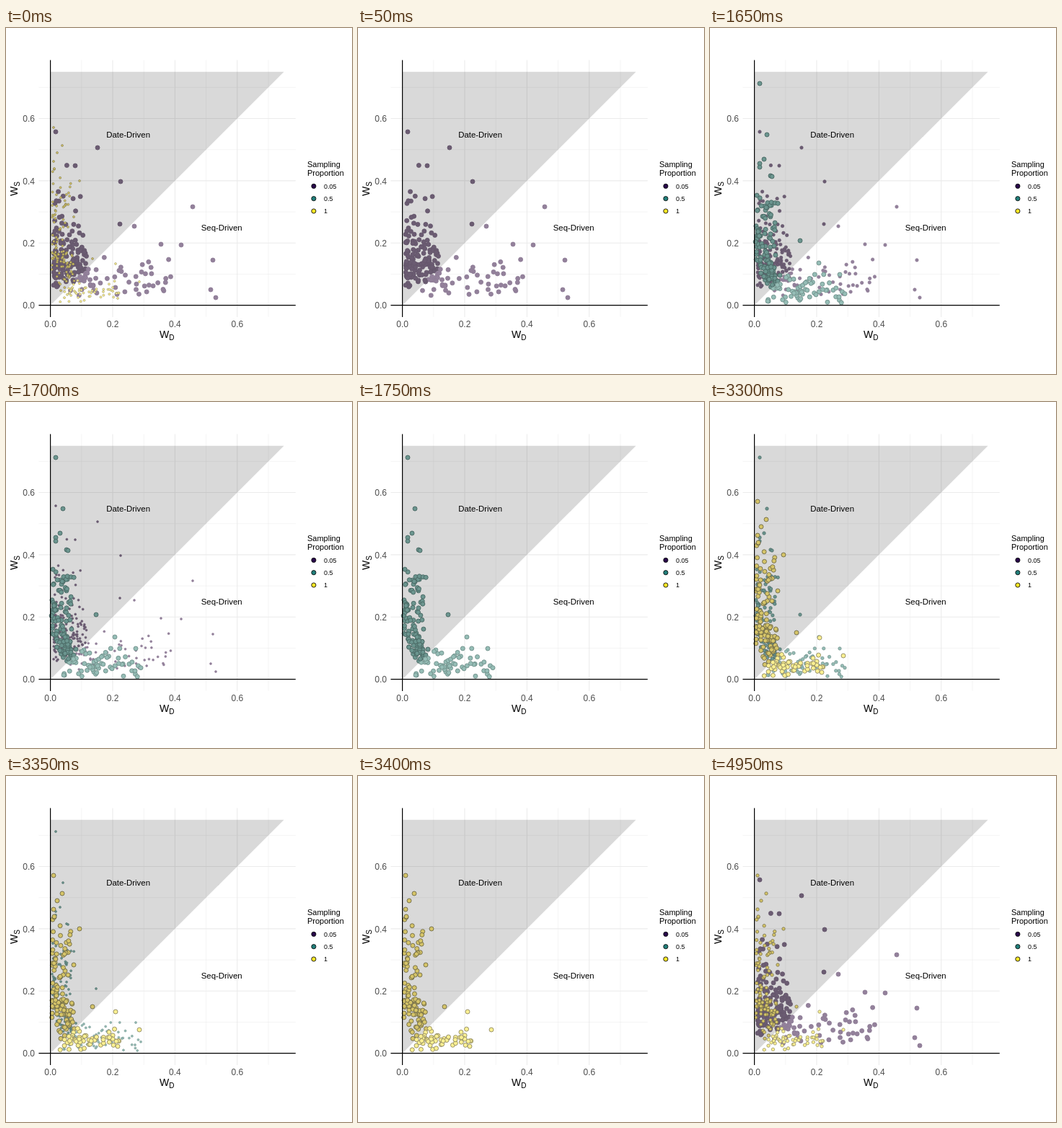
Animation, 480 px wide and 480 px high, one loop 5000 ms. Source, as an HTML page:

```html
<!DOCTYPE html>
<html lang="en">
<head>
<meta charset="utf-8">
<title>Scatter by sampling proportion</title>
<style>
  html, body { margin: 0; width: 100%; height: 100%; overflow: hidden; background: #fff; }
  svg { display: block; width: 100%; height: 100%; }
  text { font-family: "Liberation Sans", Arial, sans-serif; }
</style>
</head>
<body>
<svg id="plot" viewBox="0 0 480 480"></svg>
<script>
const svg = document.getElementById("plot");
const LOOP = 5000, STEP = 50;
const X0 = 61.6, Y0 = 384.7, UNIT = 432;
const LO = -0.0375, HI = 0.7875;
const px = v => X0 + v * UNIT;
const py = v => Y0 - v * UNIT;

function add(tag, attrs, parent = svg) {
  const el = document.createElementNS("http://www.w3.org/2000/svg", tag);
  for (const key in attrs) el.setAttribute(key, attrs[key]);
  parent.appendChild(el);
  return el;
}
function cross(v, stroke, width) {
  const attrs = { stroke, "stroke-width": width };
  add("line", { x1: px(v), y1: py(LO), x2: px(v), y2: py(HI), ...attrs });
  add("line", { x1: px(LO), y1: py(v), x2: px(HI), y2: py(v), ...attrs });
}
function label(str, x, y, size, fill = "#000", anchor = "start", parent = svg) {
  add("text", { x, y, fill, "font-size": size, "text-anchor": anchor }, parent).textContent = str;
}
function random(seed) {
  return () => (seed = (seed * 16807) % 2147483647) / 2147483647;
}

// n points that start at (x, y), reach w to the right and h upwards;
// larger powers pull them towards the start, lean tilts the cloud down.
function cloud(rnd, { n, x, w, y, h, xPow = 1, yPow = 1, lean = 0 }) {
  return Array.from({ length: n }, () => {
    const dx = w * rnd() ** xPow;
    const up = h * ((rnd() + rnd()) / 2) ** yPow;
    return [x + dx, Math.min(381, y + lean * dx - up)];
  });
}

// Clouds: dense core, tail up the vertical axis, spread along the floor.
const series = [
  {
    name: "0.05", key: "#28084a", seed: 4127, start: 4950, end: 1650,
    inside: ["#6b5c72", "#66576d"], outside: ["#93819b", "#8f7d97"],
    clouds: [
      { n: 115, x: 66, w: 46, xPow: 1.3, y: 370, h: 92 },
      { n: 24, x: 67, w: 40, xPow: 1.5, y: 300, h: 120, yPow: 1.3 },
      { n: 58, x: 100, w: 130, xPow: 1.6, y: 379, h: 68 }
    ],
    outliers: [[69, 144], [127, 166], [96, 191], [159, 213], [158, 272], [178, 275],
      [259, 248], [215, 300], [243, 301], [287, 322], [284, 363], [291, 374]]
  },
  {
    name: "0.5", key: "#21807c", seed: 9311, start: 1650, end: 3300,
    inside: ["#6b958f", "#496762"], outside: ["#95bdb6", "#71908b"],
    clouds: [
      { n: 80, x: 63, w: 28, y: 352, h: 85, lean: 1 },
      { n: 34, x: 65, w: 30, xPow: 1.2, y: 300, h: 80, yPow: 1.2 },
      { n: 66, x: 76, w: 112, y: 382, h: 46, yPow: 1.3 }
    ],
    outliers: [[69, 77], [79, 148], [75, 182], [69, 188], [69, 193], [84, 205],
      [86, 206], [125, 295], [151, 326], [180, 342], [179, 373]]
  },
  {
    name: "1", key: "#fde725", seed: 2753, start: 3300, end: 4950,
    inside: ["#d5c468", "#706a48"], outside: ["#fbf092", "#908a62"],
    clouds: [
      { n: 72, x: 63, w: 32, y: 345, h: 70, lean: 0.9 },
      { n: 40, x: 64, w: 26, xPow: 1.5, y: 310, h: 130, yPow: 1.1 },
      { n: 56, x: 73, w: 85, xPow: 1.1, y: 383, h: 34 }
    ],
    outliers: [[66, 138], [78, 163], [71, 173], [66, 185], [67, 195], [102, 212],
      [94, 262], [120, 320], [152, 327], [185, 352], [155, 375]]
  }
];

function drawPanel() {
  for (const v of [0.1, 0.3, 0.5, 0.7]) cross(v, "#ebebeb", 0.55);
  for (const v of [0.2, 0.4, 0.6]) cross(v, "#ebebeb", 1.07);
  add("path", {
    d: `M${px(0)} ${py(0)}V${py(0.75)}H${px(0.75)}Z`,
    fill: "#000", "fill-opacity": 0.15
  });
}

function drawDots(s) {
  const rnd = random(s.seed);
  const points = s.clouds.flatMap(c => cloud(rnd, c)).concat(s.outliers);
  s.group = add("g", {});
  s.dots = points.map(([cx, cy]) => {
    const [fill, stroke] = cx - X0 < Y0 - cy ? s.inside : s.outside;
    return add("circle", { cx, cy, fill, stroke }, s.group);
  });
}

function drawAxes() {
  cross(0, "#000", 1.2);
  for (const v of [0, 0.2, 0.4, 0.6]) {
    label(v.toFixed(1), px(v), 415, 12, "#4d4d4d", "middle");
    label(v.toFixed(1), 40, py(v) + 4.6, 12, "#4d4d4d", "end");
  }
  label("Date-Driven", px(0.25), 152, 11.4, "#000", "middle");
  label("Seq-Driven", px(0.55), 281, 11.4, "#000", "middle");
  const title = (sub, transform) => {
    const g = add("g", { transform });
    label("W", 0, 0, 14, "#000", "start", g);
    label(sub, 13.3, 3, 10, "#000", "start", g);
  };
  title("D", "translate(213 430)");
  title("S", "translate(15.5 233) rotate(-90)");
}

function drawLegend() {
  label("Sampling", 418, 193, 11);
  label("Proportion", 418, 205, 11);
  series.forEach((s, i) => {
    const cy = 219.4 + i * 17.3;
    add("circle", { cx: 426.9, cy, r: 3.1, fill: s.key, stroke: "#111", "stroke-width": 0.9 });
    label(s.name, 441, cy + 3.4, 9);
  });
}

drawPanel();
series.forEach(drawDots);
drawAxes();
drawLegend();

// A series appears at full size, holds, then shrinks away in two steps.
const SIZES = [3, 2.2, 1.5, 0];
function stageAt(s, t) {
  const since = (t - s.start + LOOP) % LOOP;
  const life = (s.end - s.start + LOOP) % LOOP;
  return since < life ? 0 : Math.min(3, 1 + Math.floor((since - life) / STEP));
}

function update(t) {
  for (const s of series) {
    const stage = stageAt(s, t);
    if (stage === s.stage) continue;
    s.stage = stage;
    s.group.setAttribute("display", stage < 3 ? "inline" : "none");
    s.group.setAttribute("stroke-width", 0.9 - 0.18 * stage);
    for (const dot of s.dots) dot.setAttribute("r", SIZES[stage]);
  }
}

const begin = performance.now();
function tick() {
  update((performance.now() - begin) % LOOP);
  requestAnimationFrame(tick);
}
tick();
</script>
</body>
</html>
```
